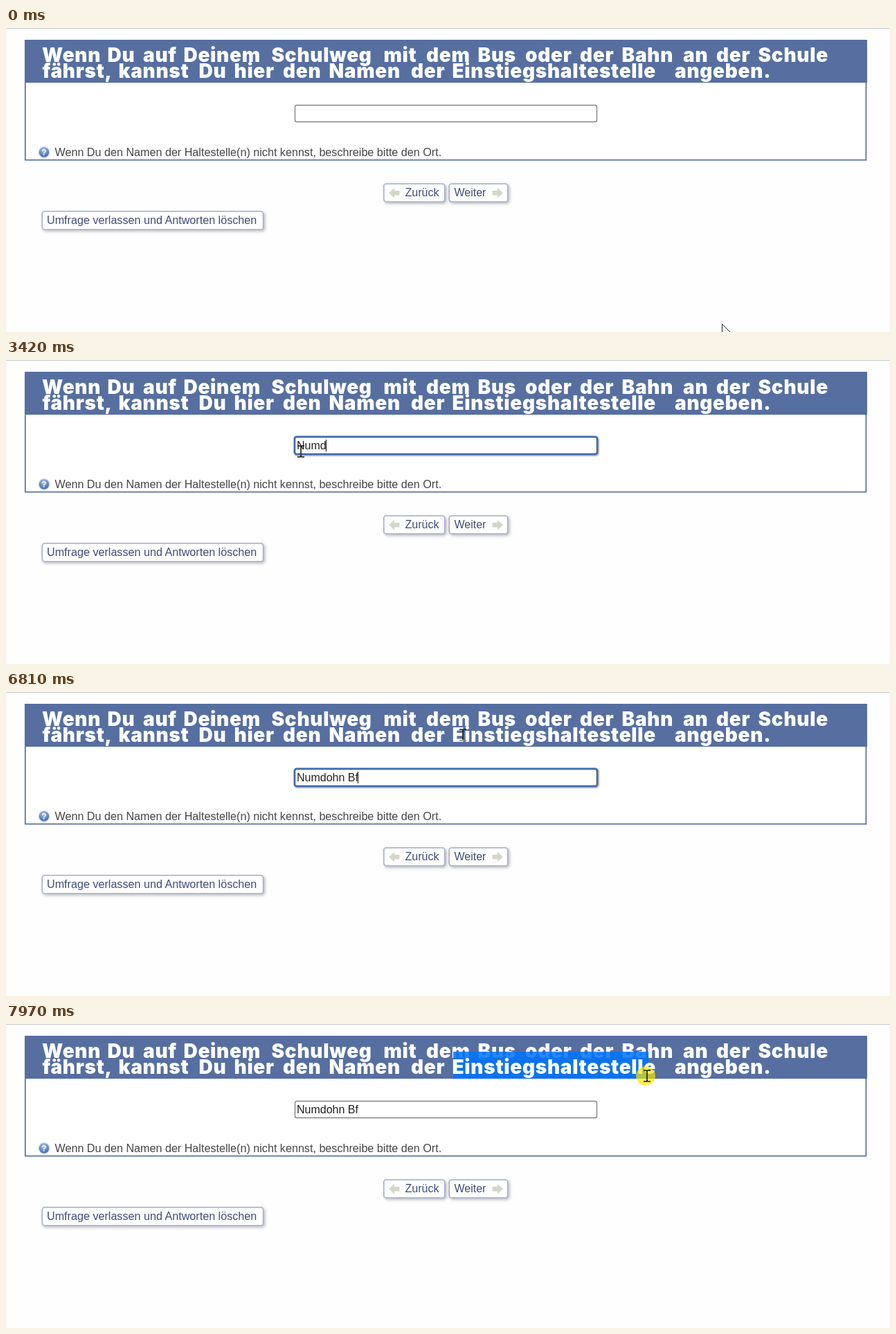
Animation, 1277 px wide and 439 px high, one loop 8000 ms. Source, as an HTML page:

```html
<!DOCTYPE html>
<html lang="de">
<head>
<meta charset="utf-8">
<title>Umfrage</title>
<style>
  html, body { margin: 0; width: 100%; height: 100%; overflow: hidden; background: #fefefe; }
  svg { display: block; font: 16px "Liberation Sans", Arial, sans-serif; }
  text { white-space: pre; }
  #title { font: 900 28px Inter, "Arial Black", sans-serif; letter-spacing: .7px; fill: #fff; }
  .wide { font-size: 16.15px; }
  .button rect { fill: #fff; stroke: #a3afd0; stroke-width: 1.6; filter: drop-shadow(2px 2px 2px #0004); }
  .button text { fill: #3d4b78; }
  .button path { fill: #d3d7ca; }
</style>
</head>
<body>
<svg width="1277" height="439" viewBox="0 0 1277 439">
  <defs>
    <radialGradient id="ball" cx=".45" cy=".3" r=".75">
      <stop offset="0" stop-color="#a9c6ec"/>
      <stop offset="1" stop-color="#2f62ad"/>
    </radialGradient>
  </defs>
  <rect width="1277" height="1" fill="#c6c6c6"/>

  <rect x="27.8" y="18" width="1214.6" height="172.6" fill="#fff" stroke="#566fa0" stroke-width="1.7"/>
  <rect x="27" y="17" width="1217" height="62" fill="#566fa0"/>
  <g id="title"></g>
  <rect id="mark" x="646" y="40" height="39" fill="rgba(2,116,250,.86)"/>
  <g id="markedTitle"></g>

  <rect id="glow" x="417" y="111" width="437" height="25" rx="3" fill="none" stroke="#3f7ee0"
        stroke-width="3" style="filter:drop-shadow(1px 1px 1px #0006)"/>
  <rect id="field" x="417.5" y="111.5" width="436" height="24" rx="2.5" fill="#fff" stroke-width="1.4"/>
  <text id="entry" x="420" y="129" fill="#222"></text>
  <rect id="caret" y="115" width="1" height="17" fill="#111"/>

  <circle cx="55" cy="179.5" r="8.3" fill="#c3cddd"/>
  <circle cx="55" cy="179.5" r="7" fill="url(#ball)"/>
  <text x="55" y="184" text-anchor="middle" fill="#fff" style="font-size:12px;font-weight:bold">?</text>
  <text class="wide" x="70.5" y="185" fill="#444">Wenn Du den Namen der Haltestelle(n) nicht kennst, beschreibe bitte den Ort.</text>

  <g class="button">
    <rect x="545.8" y="225" width="88" height="26" rx="3.5"/>
    <path d="M553 238l8-7v4h7.5v6.500h-7.500v4z"/>
    <text x="576.5" y="243">Zurück</text>
  </g>
  <g class="button">
    <rect x="640.200" y="225" width="84.600" height="26" rx="3.5"/>
    <path d="M718 238l-8-7v4h-7.500v6.500h7.500v4z"/>
    <text x="647.5" y="243">Weiter</text>
  </g>
  <g class="button">
    <rect x="52.2" y="264.700" width="319.4" height="26.300" rx="3.5"/>
    <text class="wide" x="59" y="283">Umfrage verlassen und Antworten löschen</text>
  </g>

  <circle id="press" r="14" fill="#ffe600" fill-opacity=".68"/>
  <g id="arrow">
    <path d="M.5.5v17l4-3.800 2.700 6 2.600-1.200-2.600-5.800h5.300z" fill="#fff" stroke="#222"/>
  </g>
  <g id="beam" fill="none" stroke="#151515" stroke-width="1.5">
    <path d="M-5-8h4l1 1 1-1h4M0-7V7"/>
    <path id="foot" d="M-5 8h4l1-1 1 1h4"/>
  </g>
</svg>
<script>
const LOOP = 8000, STEP = 77.5, FIRST_STEP = 67.5;
const FOCUS = 690, RELEASE = 830, DRAG = 6960, BLINK = 540;
const STOP_NAME = 'Numdohn Bf';
const keyTimes = [1860, 2080, 2860, 3420, 3640, 3720, 3870, 3950, 4180, 4420];

// time, x, y
const route = [
  [0, 1034, 427], [150, 860, 330], [310, 440, 190], [390, 324, 152], [470, 385, 138],
  [540, 424, 131], [690, 426, 132], [5180, 426, 132], [5420, 520, 115], [5650, 665, 76],
  [5810, 730, 66], [6040, 769, 67], [6350, 735, 62], [6600, 690, 60], [6810, 660, 62],
  [6900, 652, 62], [6970, 650, 63], [7275, 748, 65], [7500, 835, 68], [7740, 905, 71],
  [7830, 912, 72], [7895, 913, 72], [7972, 926, 75], [8000, 926, 75]
];

const $ = id => document.getElementById(id);
const show = (id, on) => $(id).style.display = on ? '' : 'none';
const move = (id, x, y) => $(id).setAttribute('transform', `translate(${x} ${y})`);

function addLine(y, words, starts) {
  const line = document.createElementNS('http://www.w3.org/2000/svg', 'text');
  line.setAttribute('y', y);
  words.split(' ').forEach((word, i) => {
    const span = document.createElementNS(line.namespaceURI, 'tspan');
    span.setAttribute('x', starts[i]);
    span.textContent = word;
    line.append(span);
  });
  return line;
}

$('title').append(addLine(49.3, 'Wenn Du auf Deinem Schulweg mit dem Bus oder der Bahn an der Schule',
  [52, 146.5, 198, 256.5, 383.5, 545.5, 607, 681.5, 750, 829, 889.5, 978, 1026, 1086.5]));
// The second line lies above the selection.
$('markedTitle').append(addLine(71.700, 'fährst, kannst Du hier den Namen der Einstiegshaltestelle angeben.',
  [52.5, 162.5, 278.5, 329.5, 400, 466.5, 585, 644.5, 966]));
$('markedTitle').style.cssText =
  'font:900 28px Inter,"Arial Black",sans-serif;letter-spacing:.7px;fill:#fff';

// Selection edges between the letters of the dragged word.
const edges = [646];
for (const width of [20.6, 9.5, 19, 17.5, 12.7, 9.5, 19, 19, 17.5, 19, 19, 9.5, 12.7, 19, 17.5, 12.7, 19, 9.5])
  edges.push(edges.at(-1) + width);

function pointer(t) {
  const at = Math.max(0, FIRST_STEP + Math.floor((t + 12 - FIRST_STEP) / STEP) * STEP);
  const i = Math.max(1, route.findIndex(p => p[0] >= at));
  const [t0, x0, y0] = route[i - 1], [t1, x1, y1] = route[i];
  const k = (at - t0) / (t1 - t0);
  return [Math.round(x0 + (x1 - x0) * k), Math.round(y0 + (y1 - y0) * k)];
}

function draw(t) {
  const [x, y] = pointer(t);
  const inField = x > 416 && x < 854 && y > 110 && y < 137;
  const inTitle = y < 79;
  const dragging = t >= DRAG;
  const pressed = dragging || t >= FOCUS && t < RELEASE;
  const focused = t >= FOCUS && !dragging;

  const typed = keyTimes.filter(k => k <= t).length;
  $('entry').textContent = STOP_NAME.slice(0, typed);
  const since = t - (typed ? keyTimes[typed - 1] : FOCUS);
  show('caret', focused && Math.floor(since / BLINK) % 2 === 0);
  const end = typed ? $('entry').getComputedTextLength() : 0;
  $('caret').setAttribute('x', Math.max(421, Math.floor(420 + end)));

  show('glow', focused);
  $('field').setAttribute('stroke', focused ? '#4c5870' : '#858585');

  const edge = edges.filter(e => e <= x + 3).at(-1) || 646;
  $('mark').setAttribute('width', dragging ? edge - 646 : 0);

  show('press', pressed);
  move('press', x - 2, y);
  show('beam', inField || inTitle);
  move('beam', x, y);
  $('foot').setAttribute('stroke', inTitle && !pressed ? '#94835a' : '#151515');
  show('arrow', !inField && !inTitle);
  move('arrow', x, y);
}

let start;
function tick(now) {
  start ??= now;
  draw((now - start) % LOOP);
  requestAnimationFrame(tick);
}
draw(0);
requestAnimationFrame(tick);
</script>
</body>
</html>
```
